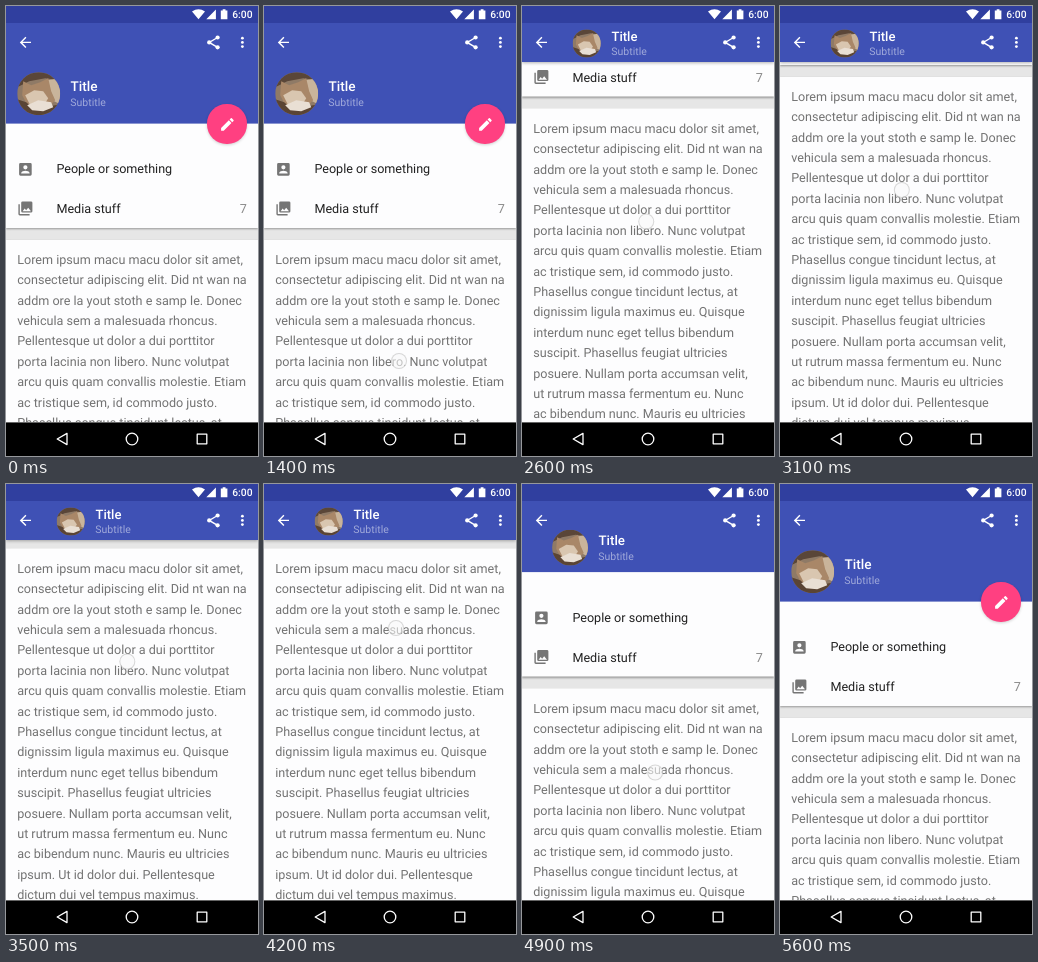
Write an HTML page that moves like this. It is 252 by 450 pixels and loops after 5.7 s.

```html
<!DOCTYPE html>
<html lang="en">
<head>
<meta charset="utf-8">
<title>Collapsing profile header</title>
<style>
  html, body { margin: 0; width: 100%; height: 100%; overflow: hidden; }
  body { font: 12.6px/20.4px Roboto, sans-serif; text-rendering: geometricPrecision; }
  #stage { position: relative; width: 252px; height: 450px; overflow: hidden; background: #e6e6e6; }
  #stage div, #stage svg, #stage span { position: absolute; }
  svg { overflow: visible; }
  .icon { width: 16.8px; height: 16.8px; fill: currentColor; }

  #content { left: 0; top: 0; width: 252px; }
  .card { left: 0; width: 252px; background: #fdfdfe; box-shadow: 0 1px 2px rgba(0, 0, 0, .35); }
  #list { top: 110px; height: 112px; color: #757575; }
  #list span { left: 50.4px; color: #212121; white-space: nowrap; }
  #list .count { left: auto; right: 11.2px; color: #8a8a8a; }
  #article { top: 233.5px; height: 380px; }
  #article div { left: 11.2px; top: 11.2px; color: #737373; white-space: pre; }

  #header { left: 0; top: -200px; width: 252px; height: 200px; background: #3f51b5; }
  #status { left: 0; top: 0; width: 252px; height: 17px; background: #303f9f; }
  #clock { right: 5.5px; top: -1.5px; color: #fff; font-size: 10.3px; font-weight: 500; }
  .action { top: 28.4px; color: #fff; }
  #avatar { left: -21.5px; top: -21.5px; width: 43px; height: 43px; }
  #title { left: 0; top: -10.2px; color: #fff; font-size: 13.6px; font-weight: 500; transform-origin: 0 50%; }
  #subtitle { left: 0; top: -10.2px; color: rgba(255, 255, 255, .5); font-size: 10.5px; }

  #fab { left: 201.4px; top: 98.4px; width: 39.2px; height: 39.2px; border-radius: 50%;
         background: #ff4081; color: #fff; box-shadow: 0 1px 3px rgba(0, 0, 0, .18); }
  #fab svg { left: 11.2px; top: 11.2px; }
  #touch { left: -8px; top: -8px; width: 14px; height: 14px; border-radius: 50%;
           border: 1px solid rgba(150, 150, 150, .35); background: rgba(248, 248, 248, .6); }
  #nav { left: 0; top: 416px; width: 252px; height: 33px; background: #000; border-top: 1px solid #666; }
  #nav svg { left: 0; top: -1px; fill: none; stroke: #fff; stroke-width: 1.3; stroke-linejoin: round; }
</style>
</head>
<body>
<div id="stage">
  <div id="content">
    <div class="card" id="list">
      <svg class="icon" style="left:11.2px;top:44.8px" viewBox="0 0 24 24"><path fill-rule="evenodd" d="M3 5v14a2 2 0 0 0 2 2h14a2 2 0 0 0 2-2V5a2 2 0 0 0-2-2H5a2 2 0 0 0-2 2zm12 4a3 3 0 0 1-6 0 3 3 0 0 1 6 0zm-9 8c0-2 4-3.1 6-3.1s6 1.1 6 3.1v1H6z"/></svg>
      <span style="top:44.3px">People or something</span>
      <svg class="icon" style="left:11.2px;top:84.4px" viewBox="0 0 24 24"><path fill-rule="evenodd" d="M22 16V4a2 2 0 0 0-2-2H8a2 2 0 0 0-2 2v12a2 2 0 0 0 2 2h12a2 2 0 0 0 2-2zm-11-4l2.03 2.71L16 11l4 5H8zM2 6v14a2 2 0 0 0 2 2h14v-2H4V6z"/></svg>
      <span style="top:83.8px">Media stuff</span>
      <span class="count" style="top:83.8px">7</span>
    </div>
    <div class="card" id="article"><div>Lorem ipsum macu macu dolor sit amet,
consectetur adipiscing elit. Did nt wan na
addm ore la yout stoth e samp le. Donec
vehicula sem a malesuada rhoncus.
Pellentesque ut dolor a dui porttitor
porta lacinia non libero. Nunc volutpat
arcu quis quam convallis molestie. Etiam
ac tristique sem, id commodo justo.
Phasellus congue tincidunt lectus, at
dignissim ligula maximus eu. Quisque
interdum nunc eget tellus bibendum
suscipit. Phasellus feugiat ultricies
posuere. Nullam porta accumsan velit,
ut rutrum massa fermentum eu. Nunc
ac bibendum nunc. Mauris eu ultricies
ipsum. Ut id dolor dui. Pellentesque
dictum dui vel tempus maximus.</div></div>
  </div>

  <div id="header"></div>
  <svg id="avatar" viewBox="0 0 43 43">
    <clipPath id="round"><circle cx="21.5" cy="21.5" r="21.5"/></clipPath>
    <g clip-path="url(#round)">
      <path fill="#8f7a66" d="M0 0h43v43H0z"/>
      <path fill="#5a4638" d="M0 0h43v8L28 6 12 9 0 15z"/>
      <path fill="#c9b49b" d="M30 8l13-2v26L33 27z"/>
      <path fill="#a98768" d="M5 23L6 9l8 4 9-3 8-4 3 13 4 9-8 8H12z"/>
      <path fill="#d9c6b0" d="M8 23l9-5 9 1 5 7-5 8-12 1z"/>
      <path fill="#5a4434" d="M0 27l9 3 8 7 26-5v11H0z"/>
      <path fill="#e9dfd4" d="M10 33l11-5 13 2 2 5-10 4-11-1z"/>
    </g>
  </svg>
  <span id="title">Title</span>
  <span id="subtitle">Subtitle</span>

  <svg class="icon action" style="left:11.2px" viewBox="0 0 24 24"><path d="M20 11H7.83l5.59-5.59L12 4l-8 8 8 8 1.41-1.41L7.83 13H20z"/></svg>
  <svg class="icon action" style="left:198.8px" viewBox="0 0 24 24">
    <circle cx="18" cy="5" r="3"/><circle cx="6" cy="12" r="3"/><circle cx="18" cy="19" r="3"/>
    <path d="M18 5L6 12l12 7" fill="none" stroke="#fff" stroke-width="2"/>
  </svg>
  <svg class="icon action" style="left:228.1px" viewBox="0 0 24 24"><circle cx="12" cy="6" r="2"/><circle cx="12" cy="12" r="2"/><circle cx="12" cy="18" r="2"/></svg>

  <div id="fab"><svg class="icon" viewBox="0 0 24 24"><path d="M3 17.25V21h3.75L17.81 9.94l-3.75-3.75zM20.71 7.04a1 1 0 0 0 0-1.41l-2.34-2.34a1 1 0 0 0-1.41 0l-1.83 1.83 3.75 3.75z"/></svg></div>

  <div id="status">
    <svg width="252" height="17" fill="#fff">
      <path d="M192.5 13.2L186 5.6q6.5-4.6 13 0zM200.3 13.2h9.6V3.6zM214.8 4.4h1.9V3.2h2.8v1.2h1.9v8.8h-6.6z"/>
    </svg>
    <span id="clock">6:00</span>
  </div>

  <div id="touch"></div>
  <div id="nav">
    <svg width="252" height="34"><path d="M61 11.4v11.2L51.2 17z"/><circle cx="126" cy="17" r="5.8"/><path d="M191.2 12.2h9.6v9.6h-9.6z"/></svg>
  </div>
</div>

<script>
  const LOOP = 5700, TICK = 100;
  const SLOP = 8, MAX_SCROLL = 169.5, EXPANDED = 117.6, COLLAPSE = 61.6;

  // Finger travel as [time, distance, speed]
  const dragUp = [[1400, 0, 0], [2100, 88, .115], [3100, 171, .035], [3500, 177.5, 0]];
  const dragDown = [[4000, 0, 0], [4200, 3.5, .07], [4900, 148, .12], [5400, 177.5, 0]];

  const $ = id => document.getElementById(id);
  const clamp = (v, lo = 0, hi = 1) => Math.min(hi, Math.max(lo, v));
  const mix = (a, b, p) => a + (b - a) * p;
  const smooth = u => u * u * (3 - 2 * u);
  const move = (id, x, y, scale = 1) => {
    $(id).style.transform = `translate(${x}px, ${y}px) scale(${scale})`;
  };

  function travel(keys, t) {
    const last = keys[keys.length - 1];
    if (t <= keys[0][0]) return keys[0][1];
    if (t >= last[0]) return last[1];
    const i = keys.findIndex(k => k[0] > t);
    const [t0, d0, v0] = keys[i - 1], [t1, d1, v1] = keys[i];
    const h = t1 - t0, u = (t - t0) / h, w = 1 - u;
    return mix(d0, d1, smooth(u)) + h * u * w * (v0 * w - v1 * u);
  }

  function render(t) {
    const up = travel(dragUp, t), down = travel(dragDown, t);
    const scroll = clamp(up - SLOP, 0, MAX_SCROLL) - clamp(down - SLOP, 0, MAX_SCROLL);
    const shift = Math.min(scroll, COLLAPSE), p = shift / COLLAPSE;

    move('content', 0, -scroll);
    move('header', 0, EXPANDED - shift);
    $('header').style.boxShadow = p === 1 ? '0 1px 3px rgba(0,0,0,.3)' : 'none';
    move('avatar', mix(32.2, 64.2, p), mix(87.2, 37, p), mix(1, .655, p));
    move('title', mix(64.5, 89.5, p), mix(81.2, 31.2, p), mix(1, .96, p));
    move('subtitle', mix(64.3, 89.3, p), mix(97.4, 46, p));

    const hidden = smooth(clamp((t - 1700) / 200)) - smooth(clamp((t - 4950) / 200));
    move('fab', 0, -shift, 1 - hidden);
    $('fab').style.opacity = 1 - hidden;

    const first = t < 3600;
    const touching = (t >= 1400 && first) || (t >= 4000 && t < 5600);
    $('touch').style.visibility = touching ? 'visible' : 'hidden';
    if (first) move('touch', 135 - up * .077, 355 - up);
    else move('touch', 132 + down * .008, 140.5 + down);
  }

  function loop() {
    const t = performance.now() % LOOP;
    render(Math.floor(t / TICK) * TICK);
    requestAnimationFrame(loop);
  }
  loop();
</script>
</body>
</html>
```
